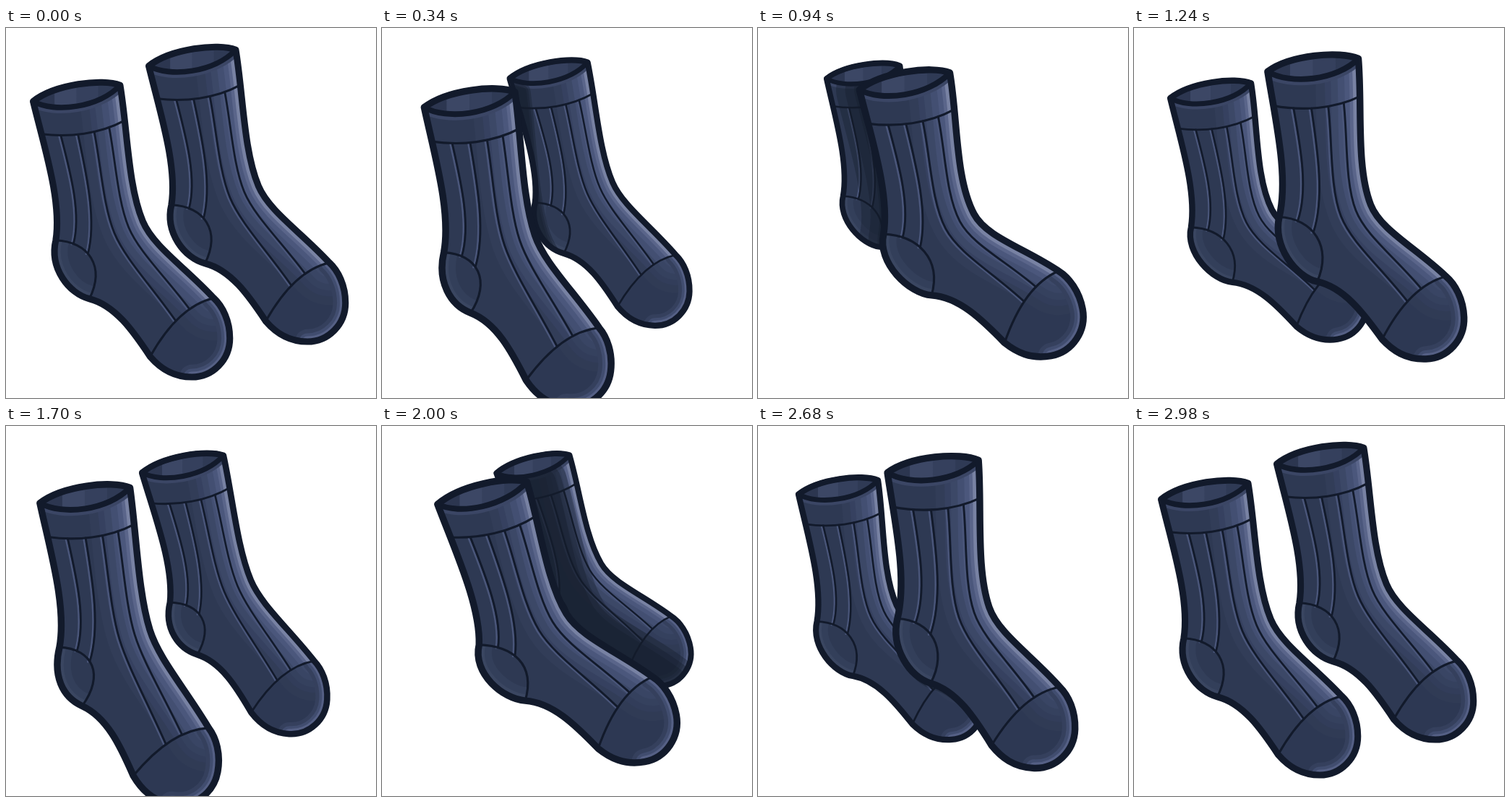
An HTML page with a canvas for the animation above (3000 ms loop, 512 px wide and 512 px high).

```html
<!DOCTYPE html>
<html lang="en">
<head>
<meta charset="utf-8">
<title>Socks</title>
<style>
html, body { margin: 0; width: 100%; height: 100%; overflow: hidden; background: #fff; }
canvas { display: block; width: 512px; height: 512px; }
</style>
</head>
<body>
<canvas id="stage" width="512" height="512"></canvas>
<script>
const ctx = document.getElementById('stage').getContext('2d');
const LOOP = 3000, STEP = 20, SPAN = 2980;
const INK = '#121a2b', BASE = '#2e3953';
const { sin, cos, PI } = Math;

// Shared swing of both socks: time, lean of the leg, swing of the foot (degrees)
const SWING = [
  [0, 0, 0], [640, 0, -3.5], [1050, -1, 11], [1240, -2.4, 5.5], [1500, 0, 0],
  [1700, .7, -6.8], [2000, 7, 10], [2400, -3.7, 3.5]
];

// Smooth cyclic interpolation through the keys
function swingAt(t) {
  const n = SWING.length;
  const key = i => {
    const [time, ...v] = SWING[(i + n) % n];
    return [time + Math.floor(i / n) * SPAN, ...v];
  };
  let i = n - 1;
  while (SWING[i][0] > t) i--;
  const [a, b, c, d] = [-1, 0, 1, 2].map(k => key(i + k));
  const h = c[0] - b[0], u = (t - b[0]) / h;
  return [1, 2].map(j => {
    const rate = (p, q) => (q[j] - p[j]) / (q[0] - p[0]);
    const slope = (p, q, r) =>
      (rate(p, q) * (r[0] - q[0]) + rate(q, r) * (q[0] - p[0])) / (r[0] - p[0]);
    const m1 = slope(a, b, c) * h, m2 = slope(b, c, d) * h, gap = b[j] - c[j];
    return ((2 * gap + m1 + m2) * u - 3 * gap - 2 * m1 - m2) * u * u * u ** 0 + m1 * u + b[j];
  });
}

// The socks circle each other half a turn apart
function poseAt(t, turn) {
  const a = 2 * PI * (t / SPAN + turn);
  const [lean, foot] = swingAt(t);
  return {
    near: sin(a),
    x: 117.5 - 78 * cos(a) - 6 * sin(a) - 2 * cos(3 * a) + 3 * sin(3 * a),
    y: 81 + 22.5 * cos(a) + 14 * sin(a) + 5 * sin(2 * a)
      + 2 * cos(3 * a) - 6 * sin(3 * a) - 4 * cos(4 * a),
    s: .977 + .108 * sin(a) + .035 * cos(2 * a),
    lean: lean - 2.3 * sin(3 * a),
    foot: foot - 3.5 * sin(3 * a)
  };
}

const add = (p, x, y) => [p[0] + x, p[1] + y];
const sub = (a, b) => [a[0] - b[0], a[1] - b[1]];
const along = (p, v, k) => [p[0] + v[0] * k, p[1] + v[1] * k];
const mix = (a, b, k) => along(a, sub(b, a), k);
const len = v => Math.hypot(v[0], v[1]);
const unit = v => along([0, 0], v, 1 / (len(v) || 1));
const turned = ([x, y], deg) => {
  const r = deg * PI / 180;
  return [x * cos(r) + y * sin(r), y * cos(r) - x * sin(r)];
};
const onCurve = ([a, b, c, d], t) => {
  const ab = mix(a, b, t), bc = mix(b, c, t), cd = mix(c, d, t);
  return mix(mix(ab, bc, t), mix(bc, cd, t), t);
};
const flip = c => [...c].reverse();

function trace(curves, closed) {
  const path = new Path2D();
  path.moveTo(...curves[0][0]);
  for (const [, b, c, d] of curves) path.bezierCurveTo(...b, ...c, ...d);
  if (closed) path.closePath();
  return path;
}

// Two curves joined smoothly at the ankle along u
function bent(a, b, c, u) {
  const v = sub(b, a), w = sub(c, b);
  return [
    [a, along(a, v, .33), along(b, u, -.28 * len(v)), b],
    [b, along(b, u, .26 * len(w)), along(c, w, -.4), c]
  ];
}

// One curve bulging to the right
const bowed = (a, b, k1, k2) => [a, add(mix(a, b, .33), k1, 0), add(mix(a, b, .72), k2, 0), b];

// Shape in its own units, with the left rim corner at the origin
function build(pose) {
  const { lean, foot } = pose;
  const ankle = turned([90, 177], lean);
  const leg = (x, y) => turned([x, y], lean);
  const toe = (x, y) => add(turned([x - 90, y - 177], foot), ...ankle);

  const rimL = [0, 0], rimR = turned([119, -22], lean * .5);
  const heelTop = leg(31, 190), bend = leg(150, 164);
  const heelEnd = toe(77, 270), toeLow = toe(160, 349), toeTop = toe(247, 269);
  const base = toe(217, 377), tip = toe(269, 324);

  const back = bowed(rimL, heelTop, 5, 17);
  const heel = [heelTop, add(heelTop, -9, 38), toe(49, 263), heelEnd];
  const sole = [heelEnd, toe(112, 279), toe(136, 313), toeLow];
  const cap = [
    [toeLow, toe(173, 364), toe(190, 377), base],
    [base, toe(246, 377), toe(269, 353), tip],
    [tip, toe(269, 300), toe(259, 280), toeTop]
  ];
  const v = unit(sub(bend, rimR)), w = unit(sub(toeTop, bend));
  const u = unit(mix(v, w, .4));
  const front = bent(rimR, bend, toeTop, u);
  const rimTop = [rimL, add(mix(rimL, rimR, .25), 0, -18), add(mix(rimL, rimR, .8), 0, -14), rimR];
  const rimLow = [rimL, add(mix(rimL, rimR, .25), 0, 22), add(mix(rimL, rimR, .76), 0, 25), rimR];

  const seamL = onCurve(back, .23), seamR = onCurve(front[0], .25);
  const seam = [seamL, add(mix(seamL, seamR, .33), 0, 11), add(mix(seamL, seamR, .7), 0, 13), seamR];
  const heelSeam = [heelTop, add(heelTop, 45, 2), toe(99, 225), heelEnd];
  const toeSeam = [toeLow, toe(178, 317), toe(207, 278), toeTop];

  const inset = k => add(bend, -u[1] * k, u[0] * k);
  const ribs = [
    [bowed(onCurve(seam, .23), onCurve(heelSeam, .2), 7, 16)],
    [bowed(onCurve(seam, .43), onCurve(heelSeam, .43), 7, 16)],
    bent(onCurve(seam, .62), inset(42), onCurve(toeSeam, .5), u),
    bent(onCurve(seam, .8), inset(21), onCurve(toeSeam, .7), u)
  ];

  return {
    pose, rimR,
    body: trace([back, heel, sole, ...cap, ...front.map(flip).reverse(), flip(rimTop)], true),
    rim: trace([rimTop, flip(rimLow)], true),
    rimLow: trace([rimLow]),
    front: trace(front),
    toeEdge: trace([cap[1], cap[2]]),
    toeCap: trace([...cap, flip(toeSeam)], true),
    heelPatch: trace([heel, flip(heelSeam)], true),
    heelEdge: trace([heel]),
    ribs: ribs.map(r => trace(r)),
    seams: [seam, heelSeam, toeSeam].map(c => trace([c]))
  };
}

function line(path, color, width) {
  ctx.strokeStyle = color;
  ctx.lineWidth = width;
  ctx.stroke(path);
}

function scoped(paint) {
  ctx.save();
  paint();
  ctx.restore();
}

const clipped = (path, paint) => scoped(() => { ctx.clip(path); paint(); });

function place({ x, y, s }) {
  ctx.setTransform(s, 0, 0, s, x, y);
}

const BANDS = [['#323d58', 116], ['#364160', 92], ['#3c4867', 76], ['#434f72', 58],
  ['#4b577c', 40], ['#5a658a', 27], ['#7882a3', 18]];

function drawSock(sock, nearer) {
  place(sock.pose);
  ctx.fillStyle = BASE;
  ctx.fill(sock.body);
  clipped(sock.body, () => {
    for (const [color, width] of BANDS) line(sock.front, color, width);
    line(sock.rimLow, '#3b4665', 16);

    clipped(sock.toeCap, () => {
      ctx.fillStyle = 'rgba(46,57,83,.45)';
      ctx.fill(sock.toeCap);
      line(sock.toeEdge, '#35405d', 34);
      line(sock.toeEdge, '#414d6f', 23);
      line(sock.toeEdge, '#556085', 15);
    });
    clipped(sock.heelPatch, () => {
      line(sock.heelEdge, '#333f5a', 36);
      line(sock.heelEdge, '#3a4661', 17);
    });

    scoped(() => {
      ctx.translate(-2.6, .6);
      for (const r of sock.ribs) line(r, '#4a567a', 2.4);
    });
    for (const r of sock.ribs) line(r, INK, 2.7);
    for (const c of sock.seams) line(c, INK, 3);

    if (nearer) castShadow(nearer, Math.abs(nearer.pose.x - sock.pose.x));

    place(sock.pose);
    const inside = ctx.createLinearGradient(0, 0, sock.rimR[0], 0);
    ['#2c3650', '#3c4765', '#35405d', '#2f3a55'].forEach((color, i) => {
      inside.addColorStop(i / 4, color);
      inside.addColorStop((i + .98) / 4, color);
    });
    ctx.fillStyle = inside;
    ctx.fill(sock.rim);
  });
  line(sock.rim, INK, 7.5);
  line(sock.body, INK, 9);
}

// Shade from the nearer sock, wider as the two cross
function castShadow(nearer, gap) {
  const spread = Math.max(0, 140 - gap) * .42;
  if (!spread) return;
  scoped(() => {
    place({ ...nearer.pose, x: nearer.pose.x + Math.min(22, spread) });
    ctx.globalAlpha = .36;
    for (const k of [.7, 1, 1.3]) line(nearer.body, '#161c2c', spread * 2 * k);
  });
}

function draw(now) {
  const t = Math.floor(now % LOOP / STEP) * STEP % SPAN;
  ctx.setTransform(1, 0, 0, 1, 0, 0);
  ctx.fillStyle = '#fff';
  ctx.fillRect(0, 0, 512, 512);
  ctx.lineJoin = ctx.lineCap = 'round';
  const [far, near] = [0, .5].map(turn => build(poseAt(t, turn)))
    .sort((a, b) => a.pose.near - b.pose.near);
  drawSock(far, near);
  drawSock(near);
}

const start = performance.now();
function tick() {
  draw(performance.now() - start);
  requestAnimationFrame(tick);
}
tick();
</script>
</body>
</html>
```
